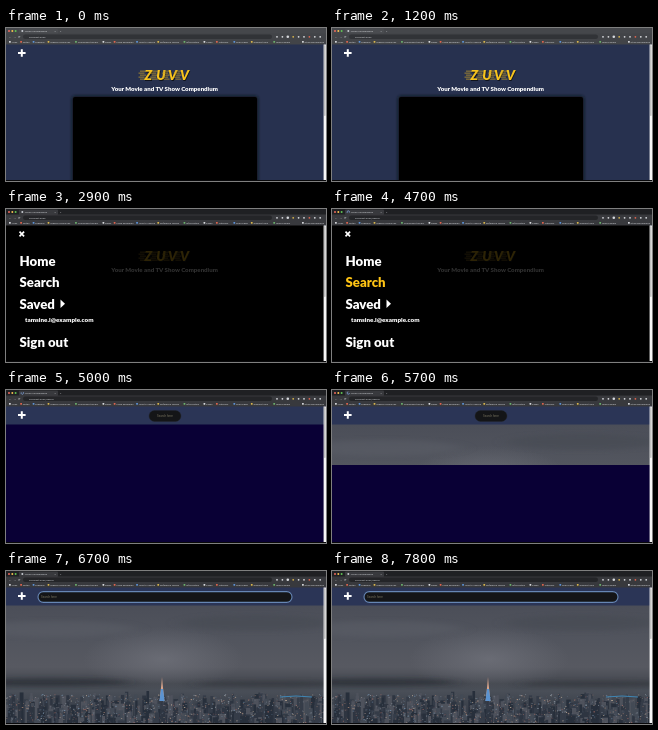
An HTML page that plays this animation: 320x153 px, repeating every 8 s.

```html
<!DOCTYPE html>
<html lang="en">
<head>
<meta charset="utf-8">
<title>Movie and TV compendium</title>
<style>
html, body { margin: 0; height: 100%; overflow: hidden; background: #000; }
svg { display: block; width: 100vw; height: 100vh; }
text { font-family: Lato, "Open Sans", sans-serif; }
.tiny { font: 2.5px Roboto, sans-serif; fill: #d6d8dc; }
.menu { font-size: 13.2px; font-weight: 900; fill: #fff; }
</style>
</head>
<body>
<svg viewBox="0 0 320 153" preserveAspectRatio="none">
  <defs>
    <linearGradient id="sky" x1="0" y1="0" x2="0" y2="1">
      <stop offset="0" stop-color="#4b4e58"/>
      <stop offset=".3" stop-color="#52555e"/>
      <stop offset=".52" stop-color="#575961"/>
      <stop offset=".6" stop-color="#4c4f57"/>
      <stop offset=".66" stop-color="#41454c"/>
      <stop offset=".72" stop-color="#4a4f58"/>
      <stop offset="1" stop-color="#2a313c"/>
    </linearGradient>
    <radialGradient id="halo">
      <stop offset="0" stop-color="#777982" stop-opacity=".6"/>
      <stop offset="1" stop-color="#777982" stop-opacity="0"/>
    </radialGradient>
    <filter id="soft" x="-30%" y="-100%" width="160%" height="300%"><feGaussianBlur stdDeviation="8 2"/></filter>
    <filter id="glow" x="-20%" y="-20%" width="140%" height="140%"><feGaussianBlur stdDeviation="1.5"/></filter>
    <clipPath id="loaded"><rect id="reveal" y="34" width="318" height="0"/></clipPath>
  </defs>

  <g id="home">
    <rect y="16" width="320" height="137" fill="#27314f"/>
    <rect x="66" y="68" width="186" height="90" rx="3" fill="#10141f" filter="url(#glow)"/>
    <rect x="67" y="69" width="184" height="90" rx="2"/>
    <rect id="shade" y="16" width="318" height="137"/>
    <g id="heading">
      <g id="title"></g>
      <text x="158.6" y="63.4" text-anchor="middle" font-size="6.1" font-weight="900" fill="#fff">Your Movie and TV Show Compendium</text>
    </g>
  </g>

  <g id="search">
    <rect y="16" width="320" height="137" fill="#090035"/>
    <g clip-path="url(#loaded)">
      <rect y="34" width="318" height="119" fill="url(#sky)"/>
      <ellipse cx="157" cy="88" rx="80" ry="32" fill="url(#halo)"/>
      <g filter="url(#soft)" opacity=".5">
        <ellipse cx="50" cy="58" rx="80" ry="8" fill="#5b5e68"/>
        <ellipse cx="250" cy="52" rx="75" ry="8" fill="#454851"/>
        <ellipse cx="40" cy="111" rx="85" ry="4" fill="#24282e"/>
        <ellipse cx="265" cy="113" rx="75" ry="3" fill="#30343b"/>
      </g>
      <g id="city"></g>
      <path d="M274 126 Q290 124 306 126" fill="none" stroke="#3f86b5" stroke-width="1"/>
      <path d="M156 106 L155.3 114 L153.6 130 H158.4 L156.7 114 Z" fill="#d9a58c"/>
      <path d="M155 118 H157 L158.6 130 H153.4 Z" fill="#5b93d0"/>
    </g>
    <rect y="16" width="318" height="18.5" fill="#2b3556"/>
    <rect id="bar" y="20.6" height="10.8" rx="5.4" fill="#141517"/>
    <text id="hint" y="27" font-size="3.1" fill="#77735f">Search here</text>
  </g>

  <g id="menu">
    <text class="menu" x="13.5" y="56.7">Home</text>
    <text class="menu" id="searchItem" x="13.5" y="78.2">Search</text>
    <text class="menu" x="13.5" y="99.8">Saved</text>
    <path d="M54.5 90.5 L59 94.8 L54.5 99 Z" fill="#fff"/>
    <text x="19" y="113.3" font-size="6.3" font-weight="900" fill="#fff">tamsine.l@example.com</text>
    <text class="menu" x="13.5" y="138">Sign out</text>
  </g>

  <path id="cross" d="M-3.8 0 H3.8 M0 -3.8 V3.8" stroke="#fff" stroke-width="2"/>

  <g id="chrome">
    <rect id="strip" width="320" height="6"/>
    <rect id="tab" x="13" y=".5" width="39" height="5.5" rx="1"/>
    <rect id="tools" y="5.5" width="320" height="11"/>
    <rect id="address" x="17" y="6.6" width="249" height="4.4" rx="2.2"/>
    <g id="lights"></g>
    <circle id="icon" cx="16.3" cy="3" r="1" fill="#c8ccd2"/>
    <path id="spinner" d="M15.1 3 A1.2 1.2 0 1 1 16.3 4.2" fill="none" stroke="#8ab4f8" stroke-width=".6"/>
    <text class="tiny" x="18.8" y="3.8">Movie Compendium</text>
    <text class="tiny" x="48.5" y="3.8">×</text>
    <text class="tiny" x="54" y="4">+</text>
    <text class="tiny" x="2.5" y="9.7" style="font-size:3px">←</text>
    <text class="tiny" x="7" y="9.7" style="font-size:3px">→</text>
    <text class="tiny" x="12" y="9.7" style="font-size:3px">⟳</text>
    <text class="tiny" id="url" x="23" y="9.7"></text>
    <g id="marks"></g>
  </g>

  <rect x="317.6" y="16.5" width="2.4" height="137" fill="#f6f6f6"/>
  <rect id="thumb" x="318" y="17" width="1.6" rx=".8" fill="#c1c1c1"/>
  <rect y="152" width="320" height="1" fill="#08080a"/>
</svg>
<script>
const $ = id => document.getElementById(id);
const set = (el, attrs) => {
  for (const k in attrs) el.setAttribute(k, attrs[k]);
};
const add = (parent, tag, attrs, text) => {
  const el = document.createElementNS("http://www.w3.org/2000/svg", tag);
  set(el, attrs);
  if (text) el.textContent = text;
  $(parent).append(el);
};
const show = (id, on) => { $(id).style.display = on ? "" : "none"; };

let seed = 11;
const rnd = (a = 0, b = 1) => {
  seed = (seed * 16807) % 2147483647;
  return a + (b - a) * seed / 2147483647;
};
const pick = list => list[Math.floor(rnd() * list.length)];

// Slanted title with speed lines
[..."ZUVV"].forEach((c, i) => {
  const x = 138.5 + i * 11.8;
  for (let k = 0; k < 5; k++)
    add("title", "rect", { x: x - 4.5 - k % 2 * 1.5, y: 42.7 + k * 2, width: 6, height: .8, fill: "#b9952c" });
  const glyph = { x, y: 52, "font-size": 13.5, "font-weight": 900, "font-style": "italic" };
  add("title", "text", { ...glyph, x: x + .7, y: 52.6, fill: "#10131c" }, c);
  add("title", "text", { ...glyph, fill: "#f7c31d" }, c);
});

// Night skyline: blocks from far to near, then lit windows
for (let i = 0; i < 380; i++) {
  const depth = i / 380, y = 122 + depth * 27 + rnd(-2, 2);
  add("city", "rect", {
    x: rnd(-3, 318), y, width: rnd(2, 4 + depth * 4), height: 153 - y,
    fill: pick(["#272f3b", "#353c48", "#434a55", "#4e525c", "#2e3541"])
  });
}
for (let i = 0; i < 900; i++) {
  add("city", "rect", {
    x: rnd(0, 318), y: rnd(123, 153), width: rnd(.4, 1.5), height: rnd(.4, 1), opacity: rnd(.25, .8),
    fill: pick(["#e8cdb0", "#b7c3cd", "#c99a80", "#7f9fbd", "#9ca4b0", "#b8746a"])
  });
}

["#ed6a5e", "#f4bf4f", "#61c554"].forEach((fill, i) => add("lights", "circle", { cx: 3 + i * 3.3, cy: 3, r: 1, fill }));

const tints = ["#d8dade", "#e0654f", "#5d93d8", "#d9b64d", "#6cb26e"];
const mark = (x, label, i) => {
  add("marks", "rect", { x, y: 12.9, width: 1.8, height: 1.8, rx: .4, fill: tints[i % 5] });
  add("marks", "text", { x: x + 2.6, y: 14.7, class: "tiny" }, label);
};
["Apps", "Notes", "Drawing", "Graphic resources", "Component library", "News", "Code examples", "How to Theme",
 "Reference Tables", "Information", "Tasks", "Tutorials", "Main Page", "Graphic tools", "Open Papers"]
  .reduce((x, label, i) => (mark(x, label, i), x + 6.2 + label.length * 1.25), 3);
mark(296, "Other Bookmarks", 0);
for (let i = 0; i < 9; i++)
  add("marks", "circle", { cx: 271 + i * 5.4, cy: 8.8, r: i === 2 ? 1.3 : .9, fill: tints[i % 3 ? 0 : i % 5] });

const clamp = v => Math.max(0, Math.min(1, v));
const ease = v => v * v * (3 - 2 * v);
const ramp = (t, from, to) => ease(clamp((t - from) / (to - from)));
const mix = (a, b, p) => a + (b - a) * p;

function draw(t) {
  const focused = t >= 1500, menu = t >= 2900 && t < 5000, page = t >= 5000;
  show("home", !page);
  show("search", page);
  show("menu", menu);
  show("shade", menu);
  set($("heading"), { opacity: menu ? .18 : 1 });

  set($("strip"), { fill: focused ? "#1f2023" : "#45474b" });
  set($("tab"), { fill: focused ? "#38393d" : "#4a4c50" });
  set($("tools"), { fill: focused ? "#38393d" : "#424448" });
  set($("address"), { fill: focused ? "#242528" : "#313337" });
  $("url").textContent = "localhost:3000" + (t >= 3900 ? "/search" : "");
  const loading = t >= 4300 && t < 6000;
  show("icon", !loading);
  show("spinner", loading);
  set($("spinner"), { transform: `rotate(${t * .6} 16.3 3)` });
  set($("thumb"), { height: page ? 51 : 71 });

  set($("cross"), { transform: `translate(15.8 25) rotate(${menu ? 45 : 0}) scale(${menu ? .85 : 1})` });
  const hover = ramp(t, 3200, 3400);
  $("searchItem").style.fill = `rgb(255 ${mix(255, 196, hover)} ${mix(255, 20, hover)})`;

  const edge = t < 5700 ? 34 : t < 5800 ? 75 : t < 6000 ? 110 : t < 6300 ? 143 : 153;
  set($("reveal"), { height: edge - 34 });
  const grow = ramp(t, 6200, 6450);
  const left = mix(143, 32, grow), right = mix(175, 286, grow);
  set($("bar"), { x: left, width: right - left, stroke: grow > 0 ? "#6686b4" : "#242629", "stroke-width": grow > 0 ? 1.1 : .4 });
  set($("hint"), { x: t < 6000 ? 151 : left + 3 });
}

const tick = now => {
  draw(now % 8000);
  requestAnimationFrame(tick);
};
draw(0);
requestAnimationFrame(tick);
</script>
</body>
</html>
```
